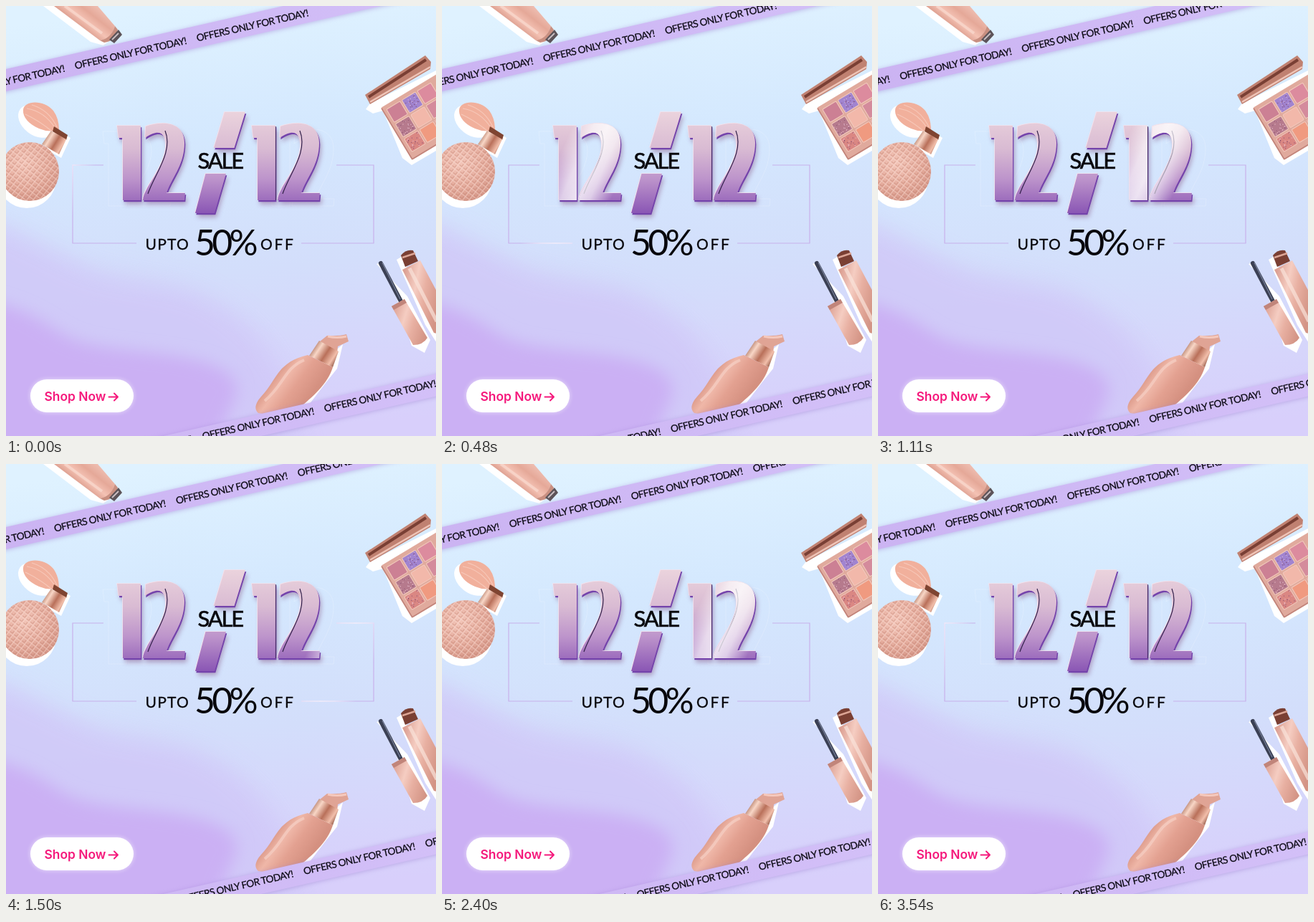
Write an HTML page that moves like this. It is 600 px wide and 600 px high and loops after 3.57 s.

```html
<!DOCTYPE html>
<html lang="en">
<head>
<meta charset="utf-8">
<title>12/12 Sale</title>
<style>
  html, body { margin: 0; width: 100%; height: 100%; overflow: hidden; background: #d9ebff; }
  svg { display: block; width: 100vw; height: 100vh; }
  .ad { font: 13.6px Lato, sans-serif; letter-spacing: -.52px; fill: #0c0a14; stroke: #0c0a14; stroke-width: .25; }
  .head { font-family: Lato, sans-serif; fill: #08070c; stroke: #08070c; }
  .cta { font: 600 17.4px Inter, sans-serif; fill: #f5197c; }
</style>
</head>
<body>
<svg viewBox="0 0 600 600" xmlns="http://www.w3.org/2000/svg">
  <defs>
    <linearGradient id="sky" x1=".45" y1="0" x2=".55" y2="1">
      <stop offset="0" stop-color="#dff2ff"/>
      <stop offset=".3" stop-color="#d4e8fe"/>
      <stop offset=".62" stop-color="#d3defb"/>
      <stop offset="1" stop-color="#d8cffb"/>
    </linearGradient>
    <linearGradient id="face" gradientUnits="userSpaceOnUse" x1="0" y1="150" x2="0" y2="290">
      <stop offset="0" stop-color="#ead2dc"/>
      <stop offset=".35" stop-color="#d9bbd3"/>
      <stop offset=".65" stop-color="#bd94cb"/>
      <stop offset="1" stop-color="#8955b4"/>
    </linearGradient>
    <linearGradient id="band" x1="0" x2="1">
      <stop offset="0" stop-color="#cbb3f2"/>
      <stop offset="1" stop-color="#d3c0f8"/>
    </linearGradient>
    <linearGradient id="peach" x1="0" y1=".3" x2="1" y2=".7">
      <stop offset="0" stop-color="#dca093"/>
      <stop offset=".35" stop-color="#f5cdc2"/>
      <stop offset=".6" stop-color="#e8b0a2"/>
      <stop offset="1" stop-color="#d39485"/>
    </linearGradient>
    <linearGradient id="tube" gradientUnits="userSpaceOnUse" x1="98" y1="27" x2="124" y2="-6">
      <stop offset="0" stop-color="#da9a8a"/>
      <stop offset=".3" stop-color="#f4c2b4"/>
      <stop offset=".6" stop-color="#e5a898"/>
      <stop offset="1" stop-color="#f0c2b6"/>
    </linearGradient>
    <linearGradient id="bottle" gradientUnits="userSpaceOnUse" x1="378" y1="512" x2="424" y2="546">
      <stop offset="0" stop-color="#dc9a8a"/>
      <stop offset=".25" stop-color="#efb7a8"/>
      <stop offset=".55" stop-color="#e3a191"/>
      <stop offset="1" stop-color="#d49080"/>
    </linearGradient>
    <linearGradient id="copper" x1="0" y1=".2" x2="1" y2=".8">
      <stop offset="0" stop-color="#8e4e38"/>
      <stop offset=".3" stop-color="#f8d6c6"/>
      <stop offset=".55" stop-color="#b9705a"/>
      <stop offset=".8" stop-color="#f2bfab"/>
      <stop offset="1" stop-color="#7d412f"/>
    </linearGradient>
    <radialGradient id="ball" cx=".4" cy=".35" r=".7">
      <stop offset="0" stop-color="#f3c5b8"/>
      <stop offset=".6" stop-color="#e5ac9d"/>
      <stop offset="1" stop-color="#d49586"/>
    </radialGradient>
    <linearGradient id="glow">
      <stop offset="0" stop-color="#fff" stop-opacity="0"/>
      <stop offset=".3" stop-color="#fff" stop-opacity=".65"/>
      <stop offset=".5" stop-color="#fff" stop-opacity=".8"/>
      <stop offset=".7" stop-color="#fff" stop-opacity=".65"/>
      <stop offset="1" stop-color="#fff" stop-opacity="0"/>
    </linearGradient>
    <pattern id="cut" width="7" height="7" patternUnits="userSpaceOnUse" patternTransform="rotate(38)">
      <path d="M0 0H7M0 0V7" stroke="#fae0d7" stroke-width="1.2" opacity=".8"/>
      <path d="M1.5 5.5H5.5V1.5" fill="none" stroke="#bd7c6d" opacity=".45"/>
    </pattern>
    <filter id="wide" x="-30%" y="-30%" width="160%" height="160%"><feGaussianBlur stdDeviation="17"/></filter>
    <filter id="soft" x="-30%" y="-30%" width="160%" height="160%"><feGaussianBlur stdDeviation="11"/></filter>
    <filter id="blur" x="-20%" y="-40%" width="140%" height="180%"><feGaussianBlur stdDeviation="3"/></filter>
    <g id="twelve">
      <path d="M155 167H188V271H163V184H157Z"/>
      <path d="M195 168C214 161 249 159 249 191C249 222 231 240 224 261H250L249 271H191C191 254 222 226 223 195C223 176 213 171 194 184Z"/>
    </g>
    <g id="letters">
      <use href="#twelve"/>
      <use href="#twelve" x="188"/>
      <path d="M305 148H334L318.500 198H290ZM278.500 234H307L291 289H264Z"/>
    </g>
    <path id="frame" d="M136 222H93V331H182M461 222H513V331H412" fill="none"/>
    <mask id="lit" maskUnits="userSpaceOnUse" x="0" y="0" width="600" height="600">
      <use href="#letters" fill="#fff"/>
      <use href="#frame" stroke="#fff" stroke-width="1.4"/>
    </mask>
  </defs>

  <!-- backdrop -->
  <rect width="600" height="600" fill="url(#sky)"/>
  <path d="M-60 290C20 305 80 358 140 372S250 388 290 412S370 470 400 540L430 660H-60Z" fill="#d0c8f8" opacity=".85" filter="url(#wide)"/>
  <path d="M-60 405C20 415 50 440 80 458S160 478 205 484S300 496 318 522S290 570 290 660H-60Z" fill="#cbb0f4" filter="url(#soft)"/>

  <!-- tube -->
  <path d="M52 0L118 50L136 55L150 44L90 0Z" fill="#fff"/>
  <path d="M67 0H128L152 28Q147 46 131 48Z" fill="url(#tube)"/>
  <path d="M82 0L134 38" stroke="#fbdfd5" stroke-width="4" opacity=".6"/>
  <path d="M131 48Q147 45 152 28L156 33Q152 49 137 51Z" fill="#c98f80"/>
  <path d="M144 47L157 33L162 40L151 52Z" fill="#5c5358"/>
  <path d="M148 47L157 38" stroke="#c9bec2" stroke-width="2"/>

  <!-- perfume -->
  <g fill="#fff">
    <ellipse cx="42" cy="161" rx="28" ry="19" transform="rotate(38 42 161)"/>
    <circle cx="29" cy="241" r="41"/>
    <path d="M70 172L90 184L77 212L56 200Z"/>
  </g>
  <path d="M24 145C25 132 52 130 66 146Q74 157 74 173Q60 177 46 171C32 165 23 155 24 145Z" fill="#f1b09c"/>
  <path d="M29 143Q54 147 69 171M36 138Q60 145 71 169M27 151Q46 160 63 174" fill="none" stroke="#f7c8b9" stroke-width="1.200"/>
  <path d="M67 168L86 180L84 187L65 175Z" fill="#7f4431"/>
  <path d="M63 174L84 186L74 207L50 193Z" fill="url(#copper)"/>
  <circle cx="33" cy="231" r="41" fill="url(#ball)"/>
  <circle cx="33" cy="231" r="41" fill="url(#cut)"/>

  <!-- palette -->
  <path d="M508 136L502 144L512 150L526 146L553 212L566 222L600 202V90Z" fill="#fff"/>
  <path d="M501 124L585 69L593 78L592 88L508 137Z" fill="#c08171"/>
  <path d="M506 127L586 75" stroke="#793f34" stroke-width="4"/>
  <path d="M508 134L592 85" stroke="#efc4b7" stroke-width="2.500"/>
  <g transform="translate(546 148) rotate(-31)">
    <rect x="-17" y="-17" width="100" height="85" rx="3" fill="#e0aa9d"/>
    <path d="M-16 -16V67H80" fill="none" stroke="#c0837a" stroke-width="1.500"/>
    <g id="pans"></g>
  </g>

  <!-- mascara -->
  <path d="M517 360L525 358L546 410L566 474L584 484L592 466L560 405ZM545 354L553 349L560 366L601 455V470L585 445Z" fill="#fff"/>
  <path d="M523 359L551 412" stroke="#3b4054" stroke-width="6" stroke-linecap="round"/>
  <path d="M525 358L550 409" stroke="#77809a" stroke-width="1.200"/>
  <path d="M538 419L556 409L588 463Q582 473 568 473Z" fill="url(#peach)"/>
  <path d="M538 419L556 409L559 414L541 424Z" fill="#c1857a"/>
  <path d="M551 348Q558 339 568 341L575 356L557 364Z" fill="#7a3f33"/>
  <path d="M553 351L571 345" stroke="#dca595" stroke-width="2.500"/>
  <path d="M553 368L578 355L601 398V457L597 456Z" fill="url(#peach)"/>
  <path d="M563 366L601 440" stroke="#fae3da" stroke-width="5" opacity=".7"/>

  <!-- pump bottle -->
  <path d="M470 472L462 506L446 526L410 573L372 580L358 564L425 510Z" fill="#fff"/>
  <path d="M438 468L448 460Q464 461 475 458L478 468L463 475L462 485Z" fill="#e0a495"/>
  <path d="M449 461Q462 464 475 461" fill="none" stroke="#f5c9bd" stroke-width="3"/>
  <path d="M437 467L464 482L456 504L423 488Z" fill="url(#copper)"/>
  <path d="M421 487L456 504C448 530 424 548 406 564Q392 573 372 571L352 568C345 562 349 553 356 545C378 522 378 497 421 487Z" fill="url(#bottle)"/>
  <path d="M416 494C388 506 388 528 361 551" fill="none" stroke="#f9d6cb" stroke-width="4" opacity=".6"/>

  <!-- ribbons -->
  <g id="ribbons"></g>

  <!-- headline -->
  <use href="#frame" stroke="#c8b1ec" stroke-width="1.200"/>
  <g fill="none" stroke="#fff" stroke-width=".7" opacity=".3">
    <use href="#twelve" x="-20" y="8"/>
    <use href="#twelve" x="208" y="8"/>
  </g>
  <use href="#letters" x="3" y="6" fill="#96759f" opacity=".6" filter="url(#blur)"/>
  <use href="#letters" x="1.300" y="2.200" fill="#7443ab"/>
  <use href="#letters" x="-.8" y="-.8" fill="#f4e2ec"/>
  <use href="#letters" fill="url(#face)"/>
  <g fill="none" stroke="#32204a" stroke-width="1.200">
    <path id="crease" d="M222 174C234 203 207 235 198 262"/>
    <use href="#crease" x="188"/>
    <path d="M376.500 168V271" opacity=".7"/>
  </g>
  <g mask="url(#lit)"><g id="shine"><rect x="-50" y="-80" width="100" height="200" fill="url(#glow)"/></g></g>

  <g class="head">
    <text x="267.500" y="227" font-size="31" letter-spacing="-2.2" stroke-width=".6">SALE</text>
    <text x="194.500" y="340" font-size="21" letter-spacing="1.2" stroke-width=".3">UPTO</text>
    <text x="263" y="347.500" font-size="50" letter-spacing="-4.800" stroke-width="0">50%</text>
    <text x="355" y="340" font-size="21" letter-spacing="2.6" stroke-width=".3">OFF</text>
  </g>

  <!-- button -->
  <rect x="34" y="521" width="144" height="46" rx="23" fill="#fff" opacity=".6" filter="url(#blur)"/>
  <rect x="34" y="521" width="144" height="46" rx="23" fill="#fff"/>
  <text class="cta" x="53.500" y="551">Shop Now</text>
  <path d="M143.500 545.500H156M151 540.500L156 545.500L151 550.500" fill="none" stroke="#f5197c" stroke-width="2" stroke-linecap="round" stroke-linejoin="round"/>
</svg>
<script>
  const LOOP = 3570, HALF = LOOP / 2, STEP = 30;
  const SLOPE = .2275, TILT = -Math.atan(SLOPE) * 180 / Math.PI;
  const GAP = 174.3, TRAVEL = 172.2;
  const byId = id => document.getElementById(id);

  const tints = ['#cc8094', '#a184d0', '#dc8b9e', '#b67a8d', '#f2b8aa', '#d48b9c', '#da8783', '#f09a80', '#c07d92'];
  const panX = i => i % 3 * 25 - 11, panY = i => Math.floor(i / 3) * 24 - 11;
  let pans = tints.map((c, i) =>
    `<rect x="${panX(i)}" y="${panY(i)}" width="22" height="21" rx="1.5" fill="${c}" stroke="#f2cbbe"/>`).join('');

  // Fine glitter on the shimmer pans
  let seed = 7;
  const rand = () => (seed = seed * 16807 % 2147483647) / 2147483647;
  for (const i of [1, 3, 6]) {
    for (let n = 0; n < 28; n++) {
      const x = panX(i) + 1 + rand() * 19, y = panY(i) + 1 + rand() * 18;
      pans += `<rect x="${x.toFixed(1)}" y="${y.toFixed(1)}" width="1" height="1" fill="${rand() < .5 ? '#f0c9d8' : '#7f4a70'}"/>`;
    }
  }
  byId('pans').innerHTML = pans;

  // A strip whose middle crosses the left side at height mid; text starts at x, y
  function ribbon(mid, x, y) {
    const at = (px, d) => `${px} ${mid - SLOPE * px + d}`;
    const strip = `M${at(-20, -15.5)}L${at(620, -15.5)}L${at(620, 15.5)}L${at(-20, 15.5)}Z`;
    const copies = [0, 1, 2, 3].map(i => `<text class="ad" x="${-i * GAP}">OFFERS ONLY FOR TODAY!</text>`).join('');
    return `<path d="${strip}" fill="#9c7fd0" opacity=".5" filter="url(#blur)" transform="translate(0 1)"/>
      <path d="${strip}" fill="url(#band)"/>
      <g transform="translate(${x} ${y}) rotate(${TILT})"><g class="run">${copies}</g></g>`;
  }
  byId('ribbons').innerHTML = ribbon(103.5, 267, 49.5) + ribbon(665.5, 445, 566.5);

  const runs = document.querySelectorAll('.run');
  const shine = byId('shine');

  function draw(ms) {
    const t = Math.floor(ms % LOOP / STEP) * STEP;
    const shift = Math.min(t / HALF, 1) * TRAVEL;
    runs.forEach(r => r.setAttribute('transform', `translate(${shift} 0)`));
    const x = 76 + .275 * (HALF - Math.abs(t - HALF));
    shine.setAttribute('transform', `translate(${x} 220) skewX(-24)`);
  }

  const start = performance.now();
  function tick() {
    draw(performance.now() - start);
    requestAnimationFrame(tick);
  }
  draw(0);
  requestAnimationFrame(tick);
</script>
</body>
</html>
```
